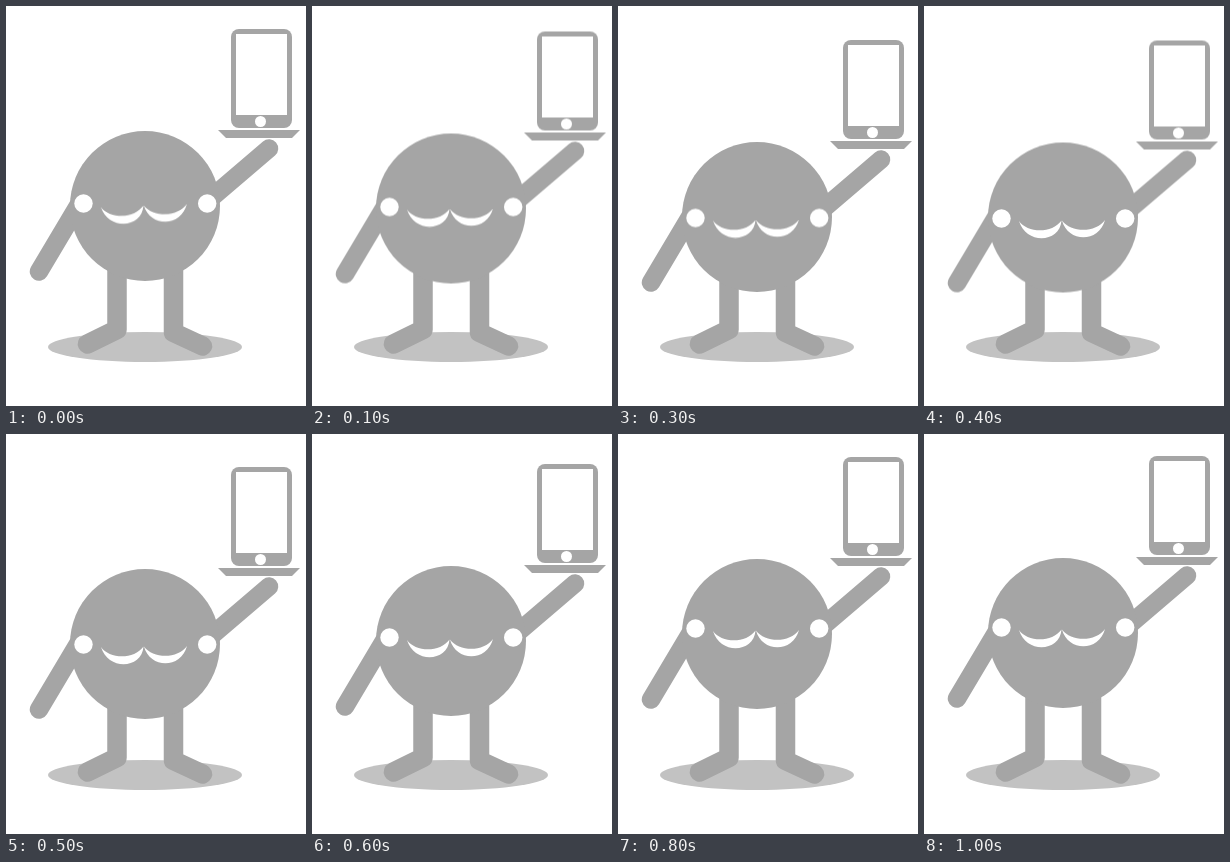
An HTML page for the animation above (1.2 s loop, 300 px wide and 400 px high).

```html
<!DOCTYPE html>
<html lang="en">
<head>
<meta charset="utf-8">
<title>Waiter with a phone</title>
<style>
  html, body { margin: 0; width: 100%; height: 100%; overflow: hidden; background: #fff; }
  svg { display: block; width: 100vw; height: 100vh; }
  .limb { fill: none; stroke: #a5a5a5; stroke-linecap: round; stroke-linejoin: round; }
  .bob, .face { animation: bob 1200ms step-end infinite; }
  .face { animation-name: face; }
  .smile { animation: tilt 1200ms step-end infinite; transform-origin: 138px 205px; }

  /* Ten poses a second; the last one is held twice as long. */
  @keyframes bob {
    0% { transform: translateY(0); }
    8.3333% { transform: translateY(2.5px); }
    16.6667% { transform: translateY(6px); }
    25% { transform: translateY(11px); }
    33.3333% { transform: translateY(11.5px); }
    41.6667% { transform: translateY(10px); }
    50% { transform: translateY(7px); }
    58.3333% { transform: translateY(3px); }
    66.6667% { transform: translateY(0); }
    75% { transform: translateY(-.7px); }
    83.3333%, 100% { transform: translateY(-1px); }
  }
  /* The face swings further than the body. */
  @keyframes face {
    0% { transform: translateY(0); }
    8.3333% { transform: translateY(3.5px); }
    16.6667% { transform: translateY(8px); }
    25% { transform: translateY(14.5px); }
    33.3333% { transform: translateY(15px); }
    41.6667% { transform: translateY(13px); }
    50% { transform: translateY(6px); }
    58.3333% { transform: translateY(1px); }
    66.6667% { transform: translateY(-3px); }
    75% { transform: translateY(-3.7px); }
    83.3333%, 100% { transform: translateY(-4px); }
  }
  @keyframes tilt {
    0% { transform: rotate(-1.5deg); }
    8.3333%, 100% { transform: none; }
  }
</style>
</head>
<body>
<svg viewBox="0 0 300 400">
  <ellipse cx="139" cy="341" rx="97" ry="15" fill="#c2c2c2"/>
  <g class="limb" stroke-width="19.5">
    <path d="M111 240V323.5L81.5 338"/>
    <path d="M167.5 240V326.5L196.5 340"/>
  </g>

  <g class="bob" fill="#a5a5a5">
    <g class="limb" stroke-width="18.5">
      <path d="M33 265.5L72 200"/>
      <path d="M263 142.5L201 195.5"/>
    </g>
    <circle cx="139" cy="200" r="75"/>
    <path d="M212 124H294L286 132H220Z"/>
    <rect x="225" y="23" width="61" height="99" rx="8"/>
    <rect x="230" y="28" width="51" height="81" fill="#fff"/>
    <circle cx="254.5" cy="115.5" r="5.5" fill="#fff"/>
  </g>

  <g class="face" fill="#fff">
    <circle cx="77.5" cy="197.5" r="9.2"/>
    <circle cx="201.2" cy="197.5" r="9.2"/>
    <g class="smile">
      <path d="M95 200C103 212 128 213 137.5 199.5C136 222 102 224 95 200Z"/>
      <path d="M138 199.5C147 212 172 212 181 199C175 222 144 222 138 199.5Z"/>
    </g>
  </g>
</svg>
</body>
</html>
```
